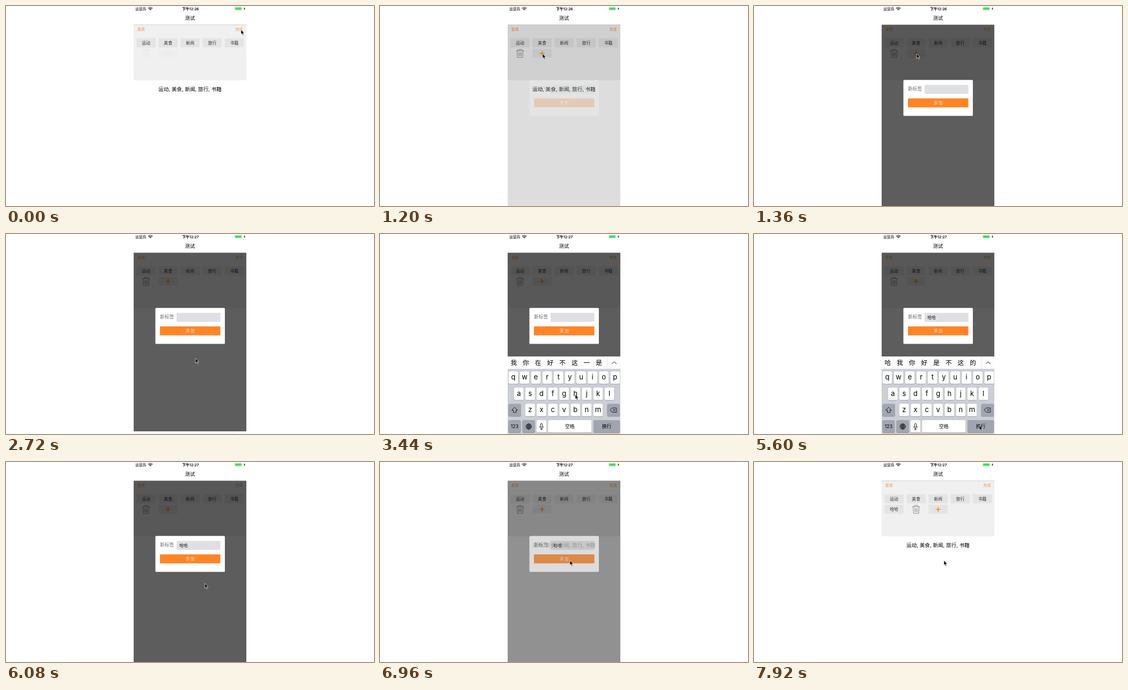
An HTML page for the animation above (8 s loop, 686 px wide and 374 px high).

```html
<!DOCTYPE html>
<html lang="zh-CN">
<head>
<meta charset="utf-8">
<title>测试</title>
<style>
html, body { margin: 0; width: 100%; height: 100%; overflow: hidden; background: #fff; }
svg { display: block; width: 686px; height: 374px; }
text { font-family: Inter, "Noto Sans CJK SC", "Noto Sans CJK", sans-serif; fill: #000; white-space: pre; }
.mid { text-anchor: middle; }
.status { font-size: 6.8px; font-weight: 500; }
.link { font-size: 6.9px; font-weight: 500; fill: #f0953c; }
.tag { font-size: 7.84px; fill: #333; text-anchor: middle; }
.input { font-size: 7.84px; fill: #111; }
.cand { font-size: 11.7px; }
.letter { font-size: 13px; text-anchor: middle; }
.label { font-size: 8.8px; text-anchor: middle; }
.line { fill: none; stroke: #111; stroke-linecap: round; stroke-linejoin: round; }

/* One loop is 8 s, so 1% is 80 ms. */
.anim { animation: 8s linear infinite; }
.step { animation: 8s step-end infinite; }

#cursor { animation-name: point; }
@keyframes point {
  0% { transform: translate(438px, 44px); }
  1% { transform: translate(435px, 48px); }
  3% { transform: translate(418px, 72px); }
  5% { transform: translate(380px, 95px); }
  7% { transform: translate(335px, 99.5px); }
  9% { transform: translate(307px, 92px); }
  10%, 19.2% { transform: translate(303px, 89px); }
  20% { transform: translate(311px, 99px); }
  21% { transform: translate(330px, 127px); }
  22% { transform: translate(346px, 146px); }
  23%, 31.2% { transform: translate(351px, 151px); }
  32% { transform: translate(351px, 170px); }
  33% { transform: translate(352px, 212px); }
  34% { transform: translate(353px, 232px); }
  37% { transform: translate(358px, 268px); }
  41%, 50% { transform: translate(364px, 300px); }
  53% { transform: translate(346px, 274px); }
  56%, 60% { transform: translate(315px, 239px); }
  63% { transform: translate(372px, 306px); }
  66%, 70% { transform: translate(420px, 358px); }
  73% { transform: translate(400px, 290px); }
  76% { transform: translate(370.5px, 227px); }
  77% { transform: translate(366px, 215px); }
  79% { transform: translate(358px, 195px); }
  82%, 100% { transform: translate(354px, 184px); }
}

#tools { animation-name: tools; }
@keyframes tools {
  0% { opacity: .08; transform: none; }
  4% { opacity: 1; }
  89% { opacity: 1; transform: none; animation-timing-function: ease-in-out; }
  93%, 100% { opacity: 1; transform: translateX(41.1px); }
}
#newTag { animation-name: newTag; }
@keyframes newTag {
  0%, 89% { opacity: 0; }
  93%, 100% { opacity: 1; }
}

#shade, #dialog { animation-name: modal; }
@keyframes modal {
  0%, 14.1% { opacity: 0; animation-timing-function: cubic-bezier(.4, 0, .6, 1); }
  17% { opacity: 1; }
  85.75% { opacity: 1; animation-timing-function: cubic-bezier(.4, 0, .6, 1); }
  89%, 100% { opacity: 0; }
}

#keyboard { animation-name: slide; }
@keyframes slide {
  0%, 33.9% { transform: translateY(146px); animation-timing-function: cubic-bezier(.25, .4, .3, 1); }
  38.5%, 71% { transform: none; animation-timing-function: cubic-bezier(.3, .1, .3, 1); }
  76.6%, 100% { transform: translateY(146px); }
}

.before { animation-name: before; }
.after { animation-name: after; }
@keyframes before { 0% { opacity: 1; } 27%, 100% { opacity: 0; } }
@keyframes after { 0% { opacity: 0; } 27%, 100% { opacity: 1; } }

.empty { animation-name: empty; }
.one { animation-name: one; }
.two { animation-name: two; }
.chosen { animation-name: chosen; }
.composing { animation-name: composing; }
.idle { animation-name: idle; }
.clear { animation-name: clear; }
@keyframes empty { 0% { opacity: 1; } 45%, 100% { opacity: 0; } }
@keyframes one { 0% { opacity: 0; } 45% { opacity: 1; } 48%, 100% { opacity: 0; } }
@keyframes two { 0% { opacity: 0; } 48% { opacity: 1; } 58%, 100% { opacity: 0; } }
@keyframes chosen { 0% { opacity: 0; } 58%, 100% { opacity: 1; } }
@keyframes composing { 0% { opacity: 0; } 45% { opacity: 1; } 58%, 100% { opacity: 0; } }
@keyframes idle { 0% { opacity: 1; } 45% { opacity: 0; } 58%, 100% { opacity: 1; } }
@keyframes clear { 0% { opacity: 0; } 45% { opacity: 1; } 70%, 100% { opacity: 0; } }

#caret { animation-name: caret; }
@keyframes caret {
  0% { opacity: 0; transform: none; }
  35% { opacity: 1; transform: none; }
  43% { opacity: 0; transform: none; }
  58% { opacity: 1; transform: translateX(16px); }
  64% { opacity: 0; transform: translateX(16px); }
  68% { opacity: 1; transform: translateX(16px); }
  70%, 100% { opacity: 0; transform: none; }
}
</style>
</head>
<body>
<svg viewBox="0 0 686 374">
  <defs>
    <clipPath id="screen"><rect x="238" width="210" height="374"/></clipPath>
    <clipPath id="strip"><rect x="238" y="229" width="186" height="24"/></clipPath>
  </defs>

  <g id="statusBar">
    <text class="status" x="241" y="7.5">运营商</text>
    <g class="line" stroke-width="1.2" stroke-linecap="butt">
      <path d="M265.4 4Q269 1 272.6 4M266.9 5.7Q269 3.9 271.1 5.7"/>
    </g>
    <path d="M267.8 6.7Q269 5.7 270.2 6.7L269 8.2Z"/>
    <g class="status mid">
      <text class="step before" x="344" y="7.5" font-weight="600">下午12:26</text>
      <text class="step after" x="344" y="7.5" font-weight="600">下午12:27</text>
    </g>
    <rect x="426.3" y="2" width="13.4" height="6" rx="1.4" fill="#fff" stroke="#9bd9a4" stroke-width=".5"/>
    <rect x="427.2" y="2.8" width="11.6" height="4.4" rx=".7" fill="#4cd964"/>
    <path d="M440.4 4v2q1-.3 1-1t-1-1" fill="#9bd9a4"/>
    <path d="M445.2 2l-2.2 3.3h1.4l-.7 2.8 2.4-3.5h-1.5z"/>
  </g>
  <text class="mid" x="343" y="26.4" font-size="9.2" font-weight="500">测试</text>

  <g clip-path="url(#screen)">
    <rect x="238" y="35" width="210" height="104" fill="#f0f0f0"/>
    <rect x="238" y="34.7" width="210" height=".7" fill="#bdbdbd"/>
    <text class="link" x="245" y="46.4">复原</text>
    <text class="link" x="427.6" y="46.4">完成</text>
    <g id="tags"></g>
    <g id="newTag" class="anim"></g>
    <g id="tools" class="anim">
      <g class="line" style="stroke:#858585" stroke-width=".9">
        <path d="M254.2 83.6h13.8M258 83.4v-2.2h6.2v2.2M255.6 83.8l.6 12.3h9.8l.6-12.3M258.8 86.8v6.4M261.1 86.8v6.4M263.4 86.8v6.4"/>
      </g>
      <rect x="284.4" y="80" width="35.6" height="16.8" rx="1" fill="#e4e4e4"/>
      <path d="M297.6 88.5h9M302.1 84v9" stroke="#f28a2a" stroke-width="1.5"/>
    </g>
    <text class="mid" x="343" y="159.4" font-size="9.6">运动, 美食, 新闻, 旅行, 书籍</text>

    <g id="shade" class="anim">
      <rect x="238" y="35.2" width="210" height="339" fill="#000" fill-opacity=".635"/>
    </g>

    <g id="dialog" class="anim">
      <rect x="278.5" y="138.2" width="129.5" height="67.3" rx="1.6" fill="#fff"/>
      <text x="287" y="158.4" font-size="8.7" style="fill:#6c6c6c">新标签</text>
      <rect x="318" y="147.6" width="81.6" height="16.6" rx="1.2" fill="#dfe0e4"/>
      <rect x="287" y="172.8" width="112.6" height="16.8" rx="1.2" fill="#ff8424"/>
      <text class="mid" x="343.3" y="184" font-size="7.5" style="fill:#fff0e2">添 加</text>
      <g class="step one">
        <rect x="322.8" y="151" width="6" height="10" fill="#b9c9e0"/>
        <text class="input" x="323.6" y="158.9">h</text>
      </g>
      <g class="step two">
        <rect x="322.8" y="151" width="11.2" height="10" fill="#b9c9e0"/>
        <text class="input" x="323.6" y="158.9">hh</text>
      </g>
      <text class="input step chosen" x="323.2" y="158.8">哈哈</text>
      <rect id="caret" class="step" x="323.4" y="150.3" width="1.2" height="10.6" fill="#426bf2"/>
      <g class="step clear">
        <circle cx="391.4" cy="156" r="4" fill="#8f9197"/>
        <path d="M390 154.6l2.8 2.8m0-2.8l-2.8 2.8" stroke="#e6e7ea" stroke-width=".8"/>
      </g>
    </g>

    <g id="keyboard" class="anim">
      <rect x="238" y="229" width="210" height="146" fill="#cbced5"/>
      <rect x="238" y="229" width="210" height="23.2" fill="#fdfdfd"/>
      <g id="candidates" clip-path="url(#strip)"></g>
      <path d="M424 230v22" stroke="#d4d5d8" stroke-width=".6"/>
      <path class="line" d="M432.6 242.6l4-3.6 4 3.6" stroke-width="1"/>
      <g id="keys"></g>
      <g class="line" stroke-width=".9">
        <path d="M251.2 324.3l5.2 5.2h-2.7v4.3h-5v-4.3H246z"/>
        <path d="M433.2 325.2h7.6v8.2h-7.6l-4-4.1zM434.6 327.4l3.8 3.8m0-3.8l-3.8 3.8"/>
        <circle cx="277.3" cy="360" r="5"/>
        <ellipse cx="277.3" cy="360" rx="2.3" ry="5"/>
        <path d="M277.3 355v10M272.3 360h10M273.3 357.2q4 1.6 8 0M273.3 362.8q4-1.6 8 0"/>
        <path d="M297.8 359.6q0 3.8 3.2 3.8t3.2-3.8M301 363.4v2.2M299.2 365.6h3.6"/>
        <rect x="299.4" y="354.4" width="3.2" height="7" rx="1.6"/>
      </g>
    </g>
  </g>

  <g id="cursor" class="anim">
    <path d="M0 0V9L2 7.2 3.5 10.7 5.1 10 3.6 6.7H6.3Z" stroke="#fff" stroke-width=".7" stroke-linejoin="round"/>
  </g>
</svg>

<script>
const el = id => document.getElementById(id);

function add(parent, name, attrs, content = '') {
  const node = document.createElementNS('http://www.w3.org/2000/svg', name);
  for (const key in attrs) node.setAttribute(key, attrs[key]);
  node.textContent = content;
  return parent.appendChild(node);
}

function addTag(parent, label, column, y) {
  const x = 243.3 + 41.1 * column;
  add(parent, 'rect', { x, y, width: 35.6, height: 16.8, rx: 1, fill: '#e4e4e4' });
  add(parent, 'text', { class: 'tag', x: x + 17.8, y: y + 11.4 }, label);
}
['运动', '美食', '新闻', '旅行', '书籍'].forEach((label, i) => addTag(el('tags'), label, i, 60.4));
addTag(el('newTag'), '哈哈', 0, 80);

const keys = el('keys');
function addKey(x, y, width, fill = '#fff') {
  const box = { x, width, height: 23.2, rx: 2.6 };
  add(keys, 'rect', { ...box, y: y + .7, fill: '#888b91' });
  add(keys, 'rect', { ...box, y, fill });
}
[['qwertyuiop', 248.4, 257], ['asdfghjkl', 258.8, 287.3], ['zxcvbnm', 279.9, 317.6]].forEach(([row, start, y]) => {
  [...row].forEach((letter, i) => {
    const x = start + 21.1 * i;
    addKey(x - 8.9, y, 17.8);
    add(keys, 'text', { class: 'letter', x, y: y + 15.4 }, letter);
  });
});

const dark = '#a0a5b0';
addKey(239.5, 317.6, 23.5, dark);
addKey(423.6, 317.6, 23.5, dark);
addKey(239.5, 348, 22.8, dark);
addKey(265.6, 348, 23.4, dark);
addKey(292, 348, 18);
addKey(313.2, 348, 81.2);
addKey(398, 348, 49.2, dark);
add(keys, 'text', { class: 'label', x: 250.9, y: 363.2 }, '123');
[['空格', '换行', 'idle'], ['选定', '确认', 'composing']].forEach(([space, enter, state]) => {
  add(keys, 'text', { class: 'label step ' + state, x: 353.8, y: 363.2 }, space);
  add(keys, 'text', { class: 'label step ' + state, x: 422.6, y: 363.2 }, enter);
});

function addCandidates(state, words) {
  const group = add(el('candidates'), 'g', { class: 'step ' + state });
  let x = 243.4;
  for (const word of words) {
    if (word === 'grin') {
      const face = add(group, 'g', { transform: `translate(${x + 6.2} 240.6)` });
      add(face, 'circle', { r: 6, fill: '#fdc94a' });
      add(face, 'ellipse', { cx: -2, cy: -1.8, rx: .8, ry: 1.3, fill: '#5d3b12' });
      add(face, 'ellipse', { cx: 2, cy: -1.8, rx: .8, ry: 1.3, fill: '#5d3b12' });
      add(face, 'path', { d: 'M-4 .8H4Q3.4 4.6 0 4.6T-4 .8Z', fill: '#7a3a1c' });
      add(face, 'path', { d: 'M-3.7 .9H3.7L3.2 2.2H-3.2Z', fill: '#fff' });
      x += 25.1;
    } else {
      add(group, 'text', { class: 'cand', x, y: 245 }, word);
      x += 11.7 * word.length + 11;
    }
  }
}
addCandidates('empty', ['我', '你', '在', '好', '不', '这', '一', '是', '有']);
addCandidates('one', ['和', '好', '会', '还', '很', '后', '哈', '或', '号']);
addCandidates('two', ['呵呵', 'grin', '哈哈', '好好', '很好', '还会']);
addCandidates('chosen', ['哈', '我', '你', '好', '是', '不', '这', '的', '在']);
</script>
</body>
</html>
```
